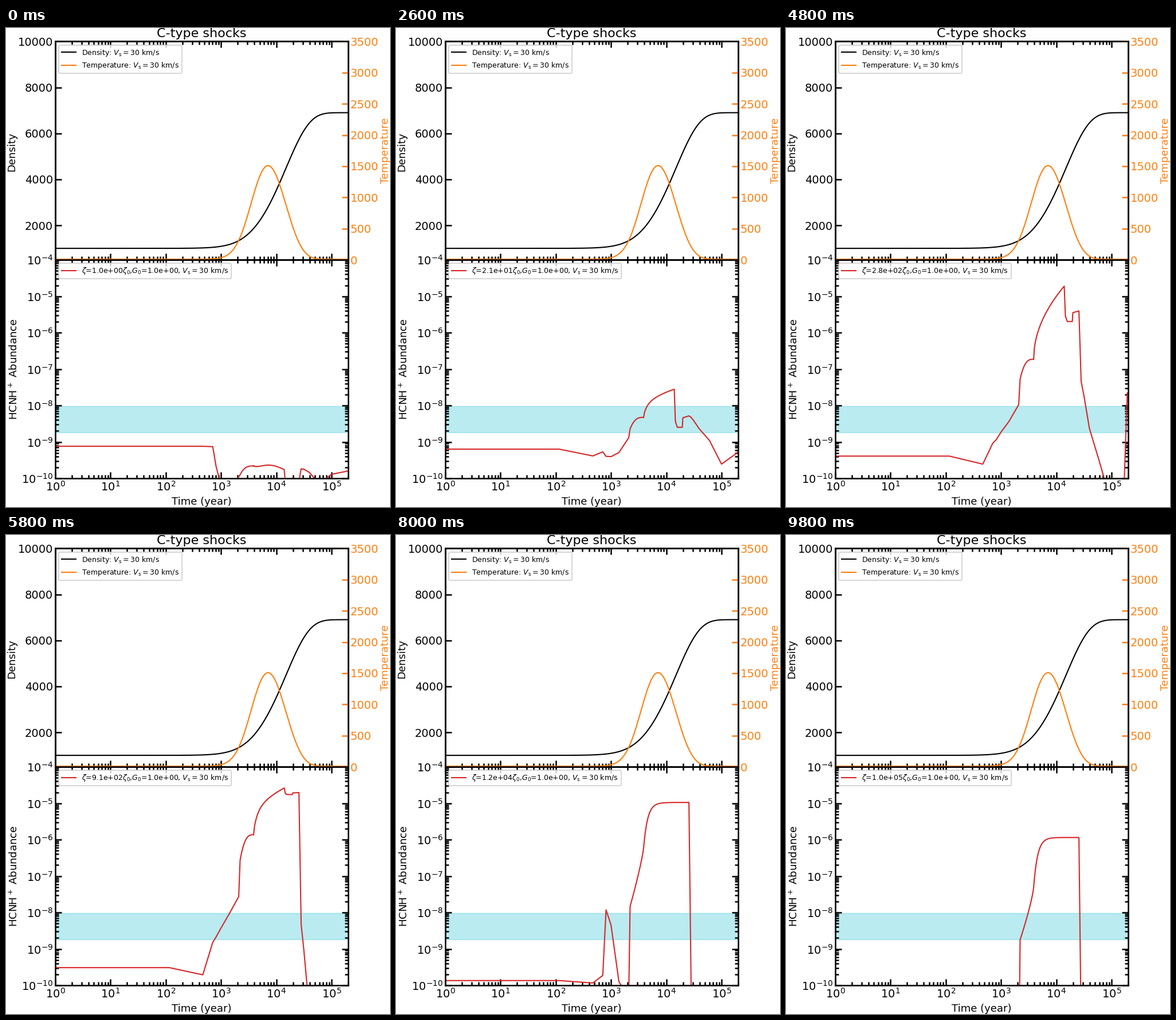
A matplotlib script that plays this animation: 670 px wide and 835 px high, repeating every 10000 ms.

```python
import numpy as np
import matplotlib.pyplot as plt
from matplotlib.animation import FuncAnimation
from matplotlib.ticker import LogLocator, MultipleLocator, NullFormatter

W, H = 670, 835
LEFT, RIGHT, TOP, MID, BOTTOM = 86, 597, 23.4, 404.2, 785
FRAMES, INTERVAL = 50, 200
T_MAX = 2e5
ORANGE, RED, CYAN = "tab:orange", "tab:red", "tab:cyan"
SPEED = r"$V_{\rm s}=30$ km/s"

plt.rcParams.update({
    "font.family": "DejaVu Sans",
    "axes.linewidth": 1.8,
    "lines.linewidth": 1.5,
    "patch.linewidth": 1.0,
})


def shock_profile():
    """Density and temperature of the neutral gas along the flow."""
    u = np.geomspace(4e-4, 20, 3000)
    ratio = 1 / (1 - 0.8551 * (1 - 1 / np.cosh(u)))
    steps = 0.5 * (ratio[1:] + ratio[:-1]) * np.diff(u)
    t = (u[0] + np.concatenate([[0], np.cumsum(steps)])) / 4.7e-4
    s = u / 0.346
    bump = s**6 / np.expm1(s)
    return t, 1000 * ratio, 10 + 1500 * bump / bump.max()


def excess(z, start):
    return max(z - start, 0)


# Each stage returns (log time, decades above 1e-10) for z = log10(zeta).

def early(z):
    """Flat start, dip, and climb until the gas heats up."""
    over, late = excess(z, 3), 4 * excess(z, 4.1)
    base = 0.88 - 0.045 * z**2
    return [
        (0, base),
        (2.064, base),
        (2.67, 0.88 - 0.2 * z),
        (2.85, 0.87 - 0.28 * z + 0.13 * z**2 - 1.5 * over),
        (2.91, 0.33 + 0.1 * z + 0.08 * z**2 - late),
        (3.0, -0.2 + 0.6 * z - 0.55 * over - late),
        (3.143, -0.3 + 0.76 * z - 2.5 * over),
        (3.32, 0.04 + 0.81 * z - 3.4 * over),
    ]


def hump(z):
    """Jump to a shelf, rise to the peak, then two lower plateaus."""
    over = excess(z, 3)
    gate = 0.1 + 0.8 * z + 0.11 * z**2 - 2.8 * over
    shelf = 0.34 + 0.78 * z + 0.17 * z**2 - 1.77 * over - 0.565 * over**2
    peak = min(0.24 + 1.2 * z + 0.35 * z**2, 5.42 - 0.34 * over**2)
    drop = max(min(0.45 + 0.45 * z, 0.97 - 1.55 * (z - 2.45)), 0)

    s = np.linspace(0, 1, 40)
    to_shelf = 1 - (1 - s) ** max(3 - 2 * over, 0.8)
    mix = np.clip(1.25 - abs(z - 2.1) / 1.6, 0, 1)
    to_peak = mix * np.sqrt(s) + (1 - mix) * (1 - np.exp(-s / 0.13))
    arch = 0.12 * max(1 - z, 0) * np.sin(np.pi * s)

    rise = zip(3.345 + 0.245 * s, gate + (shelf - gate) * to_shelf)
    climb = zip(3.59 + 0.554 * s, shelf + (peak - shelf) * to_peak + arch)
    return [
        *rise, *climb,
        (4.165, peak - 0.85 * drop),
        (4.2, peak - drop),
        (4.29, peak - drop),
        (4.3, peak - 0.75 * drop),
        (4.41, peak - 0.7 * drop),
    ]


def tail(z):
    """Decay after the shock, ending in a late rise or a spike."""
    cut = excess(z, 2.25)
    end = np.interp(z, [0, 0.8, 1.75, 2.45, 3], [0.2, 1.47, 0.1, 2.35, -2])
    return [
        (4.45, 0.26 + 0.8 * z + 0.2 * z**2 - 3.8 * cut),
        (4.5, 0.25 + 0.8 * z + 0.15 * z**2 - 4.2 * cut),
        (4.6, 0.16 + 0.9 * z - 5 * cut),
        (4.78, -0.15 + 0.9 * z - 8 * cut),
        (5.0, 0.55 * end - 10 * cut),
        (5.11, 0.72 * end - 10 * cut),
        (5.23, 0.9 * end - 11 * cut),
        (5.285, end),
        (5.31, end),
    ]


def log_zeta(step):
    return 5 * step / (FRAMES - 1)


def abundance(step):
    z = log_zeta(step)
    log_t, decades = np.array(early(z) + hump(z) + tail(z)).T
    return 10**log_t, 10 ** (decades - 10)


def zeta_label(step):
    zeta = 10 ** log_zeta(step)
    return rf"$\zeta$={zeta:.1e}$\zeta_0$,$G_0$=1.0e+00, " + SPEED


def panel(top, bottom):
    return fig.add_axes([LEFT / W, 1 - bottom / H,
                         (RIGHT - LEFT) / W, (bottom - top) / H])


def log_axis(axis):
    axis.set_major_locator(LogLocator(numticks=20))
    axis.set_minor_locator(LogLocator(subs=range(2, 10), numticks=20))
    axis.set_minor_formatter(NullFormatter())


def style_ticks(ax, **kw):
    ax.tick_params(which="both", direction="in", width=1.8,
                   labelsize=14, pad=2.7, **kw)
    ax.tick_params(which="major", length=8)
    ax.tick_params(which="minor", length=4.5)


def label(x, y, text, size=13, **kw):
    fig.text(x / W, 1 - y / H, text, fontsize=size, ha="center",
             va="baseline", rotation_mode="anchor", **kw)


def add_legend(ax, handles):
    leg = ax.legend(handles=handles, loc="upper left", fontsize=9,
                    labelspacing=0.44)
    leg.get_frame().set_linewidth(1.4)
    return leg


fig = plt.figure(figsize=(6.7, 8.35), dpi=100, facecolor="white")

upper, lower = panel(TOP, MID), panel(MID, BOTTOM)
for ax in (upper, lower):
    ax.set_xscale("log")
    log_axis(ax.xaxis)

# Upper panel: density with the temperature on a second scale
warm = upper.twinx()
t, density, temperature = shock_profile()
dens_line, = upper.plot(t, density, color="black", label="Density: " + SPEED)
temp_line, = warm.plot(t, temperature, color=ORANGE,
                       label="Temperature: " + SPEED)
upper.set_xlim(1, T_MAX)
upper.set_ylim(500, 10000)
upper.yaxis.set_major_locator(MultipleLocator(2000))
warm.set_ylim(0, 3500)
warm.yaxis.set_major_locator(MultipleLocator(500))
style_ticks(upper, top=True, labelbottom=False)
style_ticks(warm, colors=ORANGE)
add_legend(upper, [dens_line, temp_line])

# Lower panel: abundance with the observed range
lower.set_yscale("log")
lower.axhspan(1.8e-9, 9.5e-9, color=CYAN, alpha=0.3)
line, = lower.plot(*abundance(0), color=RED, label=zeta_label(0))
lower.set_xlim(1, T_MAX)
lower.set_ylim(1e-10, 1e-4)
log_axis(lower.yaxis)
style_ticks(lower, top=True, right=True)
caption = add_legend(lower, [line]).get_texts()[0]

center = (LEFT + RIGHT) / 2
label(center, 16.4, "C-type shocks", 16)
label(center, 831, "Time (year)")
label(15.4, 216, "Density", rotation=90)
label(20, 594.6, "HCNH$^+$ Abundance", rotation=90)
label(666.6, 213.8, "Temperature", rotation=90, color=ORANGE)


def update(step):
    line.set_data(*abundance(step))
    caption.set_text(zeta_label(step))
    return line, caption


anim = FuncAnimation(fig, update, frames=FRAMES, interval=INTERVAL,
                     repeat=True, repeat_delay=0, blit=False)
plt.show()
```
